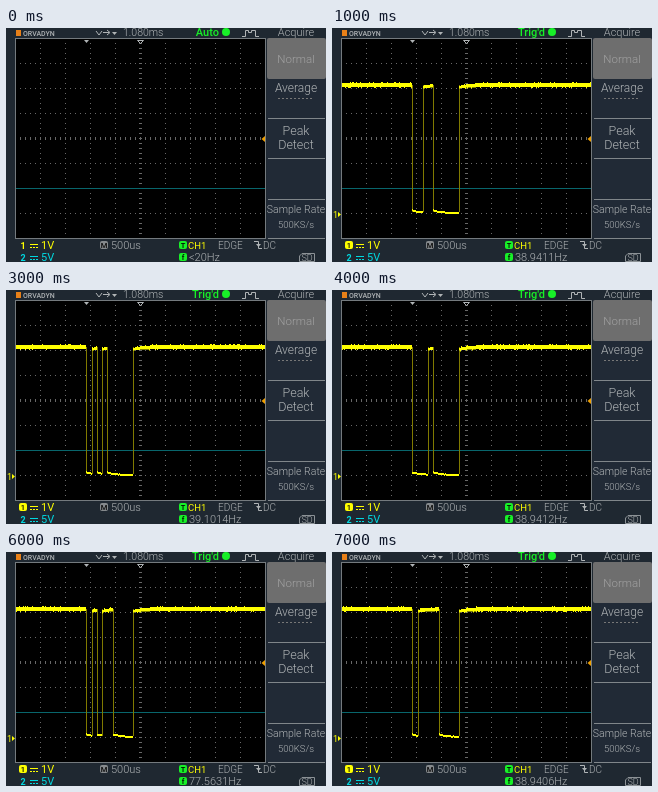
An HTML page with a canvas that plays this animation: 320x234 px, repeating every 8000 ms.

```html
<!DOCTYPE html>
<html>
<head>
<meta charset="utf-8">
<style>
html, body { margin: 0; width: 100%; height: 100%; overflow: hidden; background: #1f2831; }
canvas { display: block; width: 320px; height: 234px; }
</style>
</head>
<body>
<canvas id="scope" width="320" height="234"></canvas>
<script>
const ctx = document.getElementById('scope').getContext('2d');
const BACK = '#1f2831', YELLOW = '#ffff00', CYAN = '#00d8e0', GREEN = '#18f028', GREY = '#b0b4b6';
const LEFT = 10, RIGHT = 259, EDGE = 79.95, BIT = 5.22;
// Rates shown for each second; the first second has no signal.
const rates = ['<20Hz', '38.9411Hz', '38.9409Hz', '39.1014Hz', '38.9412Hz',
  '38.9409Hz', '77.5631Hz', '38.9406Hz'];

function rect(color, x, y, w, h) {
  ctx.fillStyle = color;
  ctx.fillRect(x, y, w, h);
}
function rounded(color, x, y, w, h, r) {
  ctx.fillStyle = color;
  ctx.beginPath();
  ctx.roundRect(x, y, w, h, r);
  ctx.fill();
}
function text(str, x, y, color = GREY, size = 11, align = 'left', weight = 300) {
  ctx.font = `${weight} ${size}px Roboto, sans-serif`;
  ctx.textAlign = align;
  ctx.textBaseline = 'alphabetic';
  ctx.fillStyle = color;
  ctx.fillText(str, x, y);
}
function path(points, color, fill) {
  ctx.beginPath();
  points.forEach(([x, y]) => ctx.lineTo(x, y));
  ctx.lineWidth = 1;
  ctx.fillStyle = ctx.strokeStyle = color;
  fill ? ctx.fill() : ctx.stroke();
}
function badge(letter, x, y, color) {
  rounded(color, x, y, 8, 8, 2);
  text(letter, x + 4, y + 7, '#000', 7.5, 'center', 500);
}
function coupling(y, color) {
  rect(color, 24, y, 8, 1);
  for (let x = 24; x < 32; x += 3) rect(color, x, y + 3, 2, 1);
}
function noise(x, seed) {
  const v = Math.sin(x * 12.9898 + seed * 78.233) * 43758.5453;
  return v - Math.floor(v);
}

function drawGrid() {
  rect('#000', 9, 10, 251, 201);
  const dot = '#686868';
  for (let i = 1; i < 10; i++)
    for (let y = 15; y < 210; y += 5) rect(dot, 9 + i * 25, y, 1, 1);
  for (let j = 1; j < 8; j++)
    for (let x = 14; x < 259; x += 5) rect(dot, x, 10 + j * 25, 1, 1);
  for (let x = 14; x < 259; x += 5) rect(dot, x, 109, 1, 3);
  for (let y = 15; y < 210; y += 5) rect(dot, 133, y, 3, 1);
  ctx.strokeStyle = '#747a7e';
  ctx.lineWidth = 1;
  ctx.strokeRect(9.5, 10.5, 250, 200);
  path([[78, 12], [83, 12], [80.5, 15]], GREY, true);
  path([[131.5, 12.5], [137.5, 12.5], [134.5, 15.5], [131.5, 12.5]], GREY);
}

function drawMenu() {
  rect('#212a36', 261, 10, 59, 201);
  rounded('#6e6e6e', 261, 10, 59, 41, 2);
  for (const y of [90, 130, 171, 210]) rect('#80868a', 262, y, 57, 1);
  text('Acquire', 290, 8, GREY, 11, 'center');
  text('Normal', 290, 35, '#a2a2a2', 11.5, 'center');
  text('Average', 290, 64, GREY, 12, 'center');
  for (let x = 272; x < 308; x += 4) rect('#777', x, 70, 2, 1);
  text('Peak', 290, 107, GREY, 12.5, 'center');
  text('Detect', 290, 121, GREY, 12.5, 'center');
  text('Sample Rate', 290, 185, GREY, 10.5, 'center');
  text('500KS/s', 290, 200, GREY, 9.5, 'center');
  path([[293.5, 233.5], [293.5, 228], [296, 225.5], [308.5, 225.5],
    [308.5, 233.5], [293.5, 233.5]], '#8c9296');
  text('SD', 301, 233, GREY, 9, 'center');
}

function drawStatus(second) {
  const live = second > 0;
  rect('#e88018', 10, 2, 5, 6);
  text('ORVADYN', 17, 8, GREY, 7, 'left', 500);
  path([[90, 3], [93, 7], [96, 3]], GREY);
  path([[97, 4.5], [103, 4.5]], GREY);
  path([[101, 2], [104, 4.5], [101, 7]], GREY);
  path([[106, 4], [111, 4], [108.5, 7]], GREY, true);
  text('1.080ms', 117, 8, GREY, 10.5);
  text(live ? "Trig'd" : 'Auto', 213, 8, GREEN, 11, 'right', 500);
  ctx.fillStyle = GREEN;
  ctx.beginPath();
  ctx.arc(220, 4, 4, 0, 7);
  ctx.fill();
  path([[236, 8.5], [239.5, 8.5], [239.5, 2.5], [242.5, 2.5], [242.5, 4.5],
    [245.5, 4.5], [245.5, 2.5], [249.5, 2.5], [249.5, 8.5], [253, 8.5]], GREY);

  if (live) badge('1', 13, 213, YELLOW);
  else text('1', 17, 221, YELLOW, 9, 'center', 700);
  coupling(216, YELLOW);
  text('1V', 35, 221, YELLOW, 11, 'left', 400);
  text('2', 17, 233, CYAN, 9, 'center', 700);
  coupling(228, CYAN);
  text('5V', 35, 233, CYAN, 11, 'left', 400);
  badge('M', 94, 213, '#85898c');
  text('500us', 105, 221);
  badge('T', 173, 213, GREEN);
  text('CH1', 182, 221, YELLOW, 9.5, 'left', 400);
  text('EDGE', 212, 221, GREY, 10);
  path([[248, 213.5], [252.5, 213.5], [252.5, 220.5], [256, 220.5]], GREY);
  path([[250, 216], [255, 216], [252.5, 219]], GREY, true);
  text('DC', 257, 221, GREY, 10);
  badge('f', 173, 225, GREEN);
  text(rates[second], 183, 233);
}

function drawTrace(second) {
  // Serial frame: start bit, then a Gray-coded counter, least significant bit first.
  const count = second + 3, code = count ^ (count >> 1);
  const level = slot => slot < 0 || slot > 8 ? 1 : slot === 0 ? 0 : code >> (slot - 1) & 1;
  let last = 1, since = 99;
  for (let x = LEFT; x < RIGHT; x++) {
    const high = level(Math.floor((x - EDGE) / BIT));
    if (high !== last) {
      rect('#807a00', x, 57, 1, 127);
      since = 0;
    }
    last = high;
    const n = noise(x, second), m = noise(x + 400, second);
    if (high) {
      const rise = x > EDGE ? Math.round(3 * Math.exp(-since / 9)) : 0;
      const top = 55 + rise - (n > .85 ? 1 : 0);
      rect(YELLOW, x, top, 1, 59 + rise / 2 + (m > .85 ? 1 : 0) - top);
    } else {
      const droop = 2.5 * (1 - Math.exp(-since / 7));
      rect(YELLOW, x, Math.round(181.3 + droop + n * .3), 1, 2);
    }
    since++;
  }
  text('1', 1, 190, YELLOW, 9, 'left', 400);
  path([[6, 184], [9, 186.5], [6, 189]], YELLOW, true);
}

function draw(now) {
  const second = Math.floor(now / 1000) % 8;
  rect(BACK, 0, 0, 320, 234);
  drawGrid();
  drawMenu();
  drawStatus(second);
  rect('#08666c', LEFT, 160, 249, 1);
  if (second) drawTrace(second);
  path([[259, 108], [255.5, 111], [259, 114]], '#f0a000', true);
  requestAnimationFrame(() => draw(performance.now()));
}
draw(0);
</script>
</body>
</html>
```
